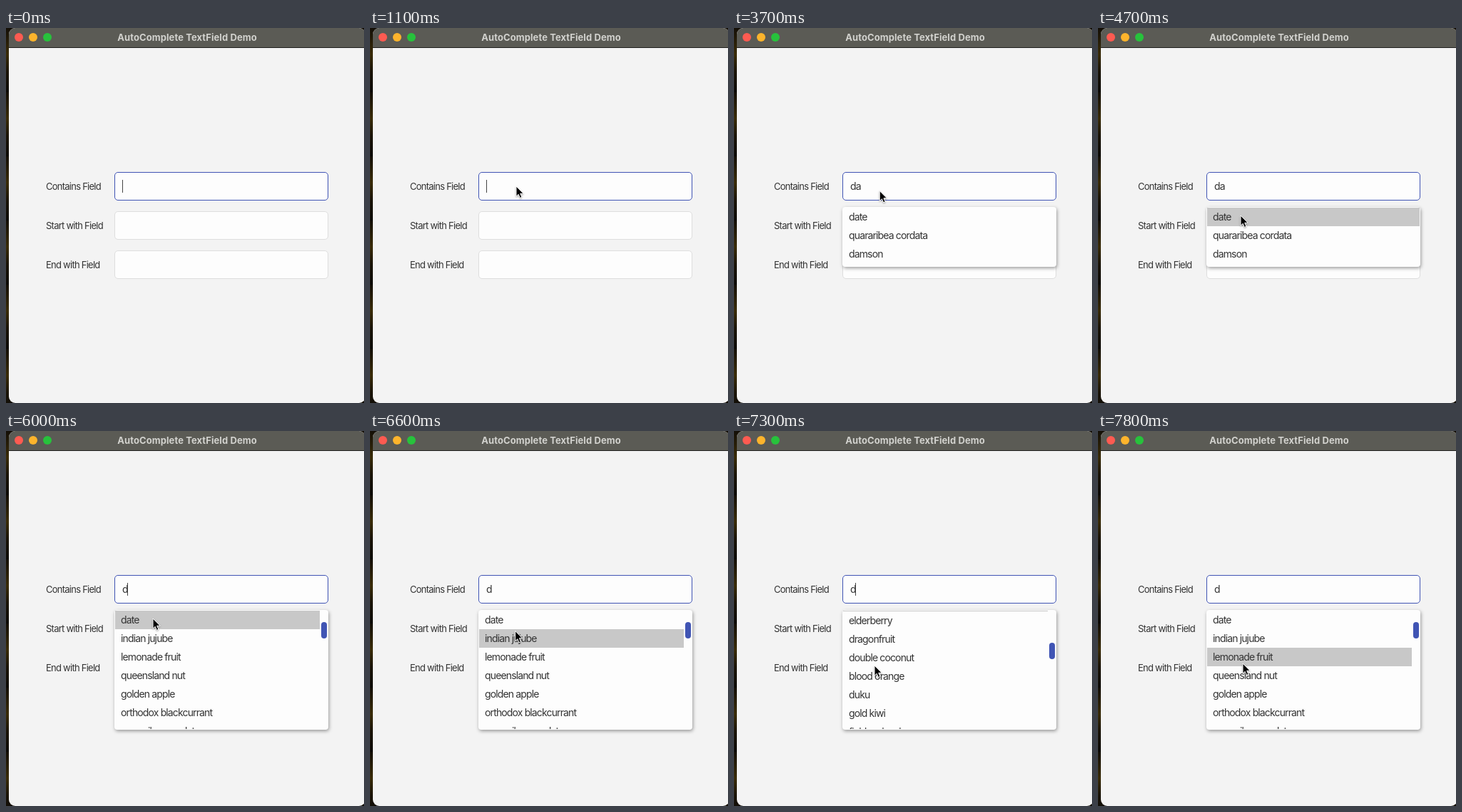
An HTML page that plays this animation: 502 by 526 pixels, repeating every 8000 ms.

```html
<!DOCTYPE html>
<html lang="en">
<meta charset="utf-8">
<title>AutoComplete TextField Demo</title>
<style>
html, body { margin: 0; width: 100%; height: 100%; overflow: hidden; }
body { position: relative; background: repeating-linear-gradient(#140f07, #3a2c08 37px, #1a1408 61px, #0c0a06 90px); font: 14px/26px Inter, sans-serif; color: #333; }
div, svg { position: absolute; box-sizing: border-box; white-space: pre; }
#window { left: 4px; top: 0; width: 500px; height: 526px; border-radius: 9px; background: #f3f3f3; overflow: hidden; }
#bar { width: 100%; height: 28px; background: #5b5b55; border-bottom: 1px solid #1e1e1c; color: #d2d2ce; font-weight: 700; font-size: 13px; letter-spacing: .09px; text-align: center; }
.light { top: 7px; width: 12px; height: 12px; border-radius: 50%; }
.label { left: 52px; font-size: 13px; letter-spacing: -.75px; }
.field { left: 148px; width: 300px; height: 40px; border: 1px solid #dedede; border-radius: 5px; background: #fdfdfd; }
.focus { border-color: #4054b4; }
.tight { letter-spacing: -.86px; }
#typed { left: 163px; top: 209px; }
#caret { top: 213px; width: 1px; height: 18px; background: #444; }
#popup { left: 152px; top: 251px; width: 300px; border-radius: 4px; background: #fdfdfd; box-shadow: 1px 2px 5px rgba(0, 0, 0, .38); }
#list { inset: 1px; overflow: hidden; }
.row { left: 0; height: 26px; padding-left: 8px; }
#thumb { left: 289px; width: 8px; height: 23px; border-radius: 4px; background: #4054b4; }
#cursor { left: -2px; top: -3px; filter: drop-shadow(0 1px 1px rgba(0, 0, 0, .35)); }
</style>
<body>
<div id="window"><div id="bar">AutoComplete TextField Demo</div></div>
<div id="typed" class="tight"></div>
<div id="caret"></div>
<div id="popup"><div id="list" class="tight"><div id="thumb"></div></div></div>
<svg id="cursor" width="16" height="22" viewBox="-2 -2 16 22">
  <path d="M0 0V14.3L3.2 11.3 5.4 16.4 7.9 15.3 5.7 10.3H10.2Z" stroke="#fff"/>
</svg>
<script>
const LOOP = 8000, ROW = 26, LIST_TOP = 252, MAX_HEIGHT = 168, BLINK = 500;
const [win, typed, caret, popup, list, thumb, cursor] =
  ['window', 'typed', 'caret', 'popup', 'list', 'thumb', 'cursor'].map(id => document.getElementById(id));

function add(parent, className, style = {}, text = '') {
  const el = document.createElement('div');
  el.className = className;
  el.textContent = text;
  Object.assign(el.style, style);
  parent.append(el);
  return el;
}

['#fe5b51', '#fdb42c', '#27c23c'].forEach((background, i) =>
  add(win, 'light', { background, left: 8 + 20 * i + 'px' }));

['Contains Field', 'Start with Field', 'End with Field'].forEach((text, i) => {
  const y = 202 + 55 * i;
  add(win, i ? 'field' : 'field focus', { top: y + 'px' });
  add(win, 'label', { top: y + 7 + 'px' }, text);
});

const fruits = ['date', 'indian jujube', 'lemonade fruit', 'queensland nut', 'golden apple',
  'orthodox blackcurrant', 'quararibea cordata', 'damson', 'elderberry', 'dragonfruit',
  'double coconut', 'blood orange', 'duku', 'gold kiwi', 'field orchard', 'red mulberry'];
const rows = fruits.map(text => add(list, 'row', {}, text));
list.append(thumb);

// Share of the way from time a to time b, eased at both ends
function ease(t, a, b) {
  const u = Math.min(1, Math.max(0, (t - a) / (b - a)));
  return u * u * (3 - 2 * u);
}

// Each key press: time, field text, end of the steady caret
const keys = [[0, '', 600], [1400, 'd', 1800], [3000, 'da', 3700], [6000, 'd', 6500]];

// Each mouse move: start, end, where it goes
const moves = [[100, 800, 205, 223], [3500, 4300, 200, 264], [5400, 5500, 206, 264],
  [6500, 6800, 197, 330], [7400, 7800, 203, 327]];

function mouseAt(t) {
  return moves.reduce(([x, y], [a, b, toX, toY]) => {
    const u = ease(t, a, b);
    return [x + (toX - x) * u, y + (toY - y) * u];
  }, [240, 378]);
}

const scrollAt = t => Math.round(207 * (ease(t, 6780, 7200) - ease(t, 7400, 7700)));

function draw(t) {
  const [, text, steady] = keys.findLast(key => t >= key[0]);
  typed.textContent = text;
  caret.style.left = 163 + 7.3 * text.length + 'px';
  caret.hidden = t >= steady && Math.floor((t - steady) / BLINK) % 2 === 0;

  const [x, y] = mouseAt(t);
  cursor.style.display = t < 100 ? 'none' : '';
  cursor.style.transform = `translate(${x}px, ${y}px)`;

  // The highlight only catches up with scrolling now and then
  const hover = Math.floor((y - LIST_TOP + scrollAt(t - t % 350)) / ROW);
  const scroll = scrollAt(t);
  const matches = rows.filter(row => row.textContent.includes(text));
  const full = matches.length * ROW + 6;
  thumb.hidden = full < MAX_HEIGHT;
  thumb.style.top = 16 + scroll * 0.14 + 'px';
  popup.hidden = !text;
  popup.style.height = Math.min(MAX_HEIGHT, full) * ease(t, 1350, 1500) + 'px';

  rows.forEach(row => {
    const i = matches.indexOf(row);
    row.hidden = i < 0;
    row.style.top = ROW * i - scroll + 'px';
    row.style.width = (thumb.hidden ? 298 : 287) + 'px';
    row.style.background = i === hover ? '#c8c8c8' : '';
  });
}

const start = performance.now();
function tick() {
  draw((performance.now() - start) % LOOP);
  requestAnimationFrame(tick);
}
tick();
</script>
</body>
</html>
```
